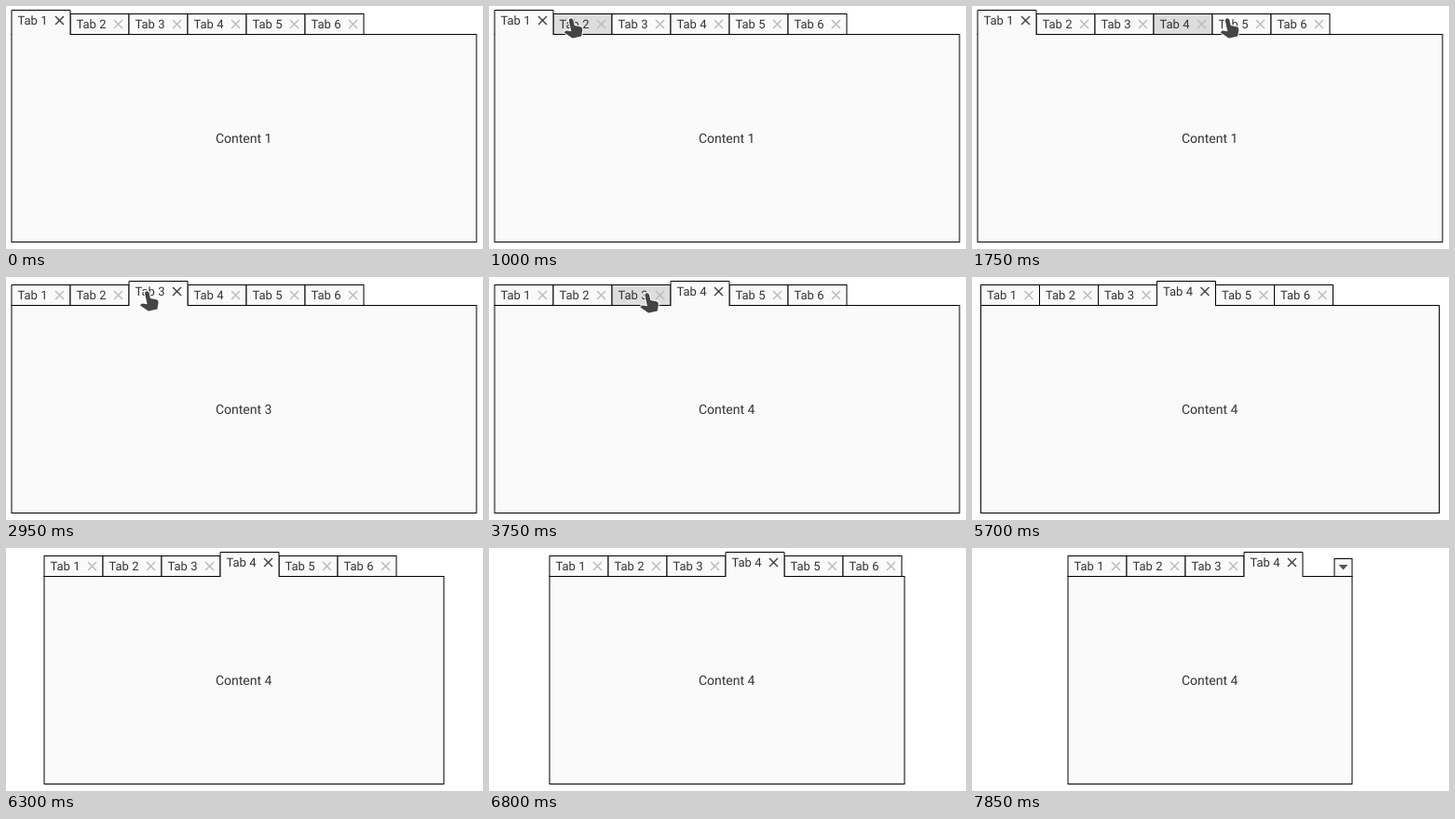
Write an HTML page with a canvas that moves like this. It is 512 by 261 pixels and loops after 8000 ms.

```html
<!DOCTYPE html>
<html lang="en">
<head>
<meta charset="utf-8">
<title>Resizable tabs</title>
<style>
html, body { margin: 0; width: 100%; height: 100%; overflow: hidden; background: #fff; }
canvas { display: block; }
</style>
</head>
<body>
<canvas id="stage" width="512" height="261"></canvas>
<script>
const ctx = document.getElementById('stage').getContext('2d');
const LOOP = 8000, STEP = 50, TAB = 63, MENU = 19;
const MID = 255.5, TOP = 30.5, BOTTOM = 253.5, HOVER_LAG = 75;

// Each move runs from start to end towards a value and rests there until the next.
function follow(value, moves, t) {
  for (const [start, end, to, power = 1] of moves) {
    const p = Math.min(1, Math.max(0, (t - start) / (end - start)));
    value += (to - value) * p ** power;
  }
  return value;
}

const handX = t => follow(-14, [[250, 1900, 318, 1.5], [2050, 2650, 151], [2950, 3250, 224], [3550, 4450, -22]], t);
const handY = t => follow(13, [[2050, 2650, 15], [3550, 3750, 17]], t);
const panelLeft = t => Math.round(2 * follow(6, [
  [5660, 5900, 27], [6050, 6300, 41], [6400, 6800, 65],
  [6900, 7100, 72], [7250, 7500, 86], [7600, 7850, 103]
], t)) / 2;

function line(color, width, ...points) {
  ctx.beginPath();
  points.forEach(([x, y]) => ctx.lineTo(x, y));
  ctx.strokeStyle = color;
  ctx.lineWidth = width;
  ctx.stroke();
}

function box(x, y, w, h, fill = '#fafafa') {
  ctx.fillStyle = fill;
  ctx.fillRect(x, y, w, h);
  ctx.strokeStyle = '#000';
  ctx.lineWidth = 1;
  ctx.strokeRect(x, y, w, h);
}

function label(text, x, y, size, align) {
  ctx.font = size + 'px Roboto, sans-serif';
  ctx.textRendering = 'geometricPrecision';
  ctx.textAlign = align;
  ctx.fillStyle = '#333';
  ctx.fillText(text, x, y);
}

function drawTab(n, x, active, hover) {
  const y = active ? 4.5 : 8.5;
  if (active) {
    ctx.fillStyle = '#fafafa';
    ctx.fillRect(x, y, TAB, TOP - y + .5);
    line('#000', 1, [x, TOP + .5], [x, y], [x + TAB, y], [x + TAB, TOP + .5]);
  } else {
    box(x, y, TAB, TOP - y, hover ? '#ddd' : '#fafafa');
  }
  label('Tab ' + n, x + 6.5, y + 15.5, 13, 'left');
  const cx = x + 51.5, cy = y + 11, r = 4.5, color = active ? '#444' : '#bbb';
  line(color, 1.5, [cx - r, cy - r], [cx + r, cy + r]);
  line(color, 1.5, [cx + r, cy - r], [cx - r, cy + r]);
}

function drawMenu(right) {
  box(right - MENU, 11.5, MENU, TOP - 11.5);
  const x = right - MENU / 2;
  ctx.fillStyle = '#555';
  ctx.fill(new Path2D(`M${x - 5} 18h10l-5 5.5Z`));
}

const hand = new Path2D('M-2 2.5Q-2 .6 0 .3Q2 .2 2.6 2L4 8L10.5 9.2Q13 10 12.6 12.4' +
  'L11.4 19.6L2.4 21.4Q1.4 21.6 .6 20.8L-7 15.4L-6.2 14.2Q-5.6 13.6 -4.6 13.6L.6 14.3Z');

function drawHand(x, y) {
  ctx.save();
  ctx.translate(x, y);
  ctx.lineJoin = 'round';
  ctx.strokeStyle = '#fff';
  ctx.lineWidth = 2;
  ctx.stroke(hand);
  ctx.fillStyle = '#444';
  ctx.fill(hand);
  ctx.restore();
}

function draw(t) {
  const left = panelLeft(t), width = 2 * (MID - left);
  const active = t < 2950 ? 1 : t < 3550 ? 3 : 4;
  const hover = Math.floor((handX(t - HOVER_LAG) - left) / TAB) + 1;
  const overflow = 6 * TAB > width;
  const count = overflow ? Math.floor((width - MENU) / TAB) : 6;

  ctx.clearRect(0, 0, 512, 261);
  box(left, TOP, width, BOTTOM - TOP);
  label('Content ' + active, 255.2, 147, 14, 'center');
  for (let n = 1; n <= count; n++)
    if (n !== active) drawTab(n, left + (n - 1) * TAB, false, n === hover);
  drawTab(active, left + (active - 1) * TAB, true);
  if (overflow) drawMenu(left + width);
  if (t >= 250) drawHand(handX(t), handY(t));
}

function tick() {
  draw(Math.floor(performance.now() % LOOP / STEP) * STEP);
  requestAnimationFrame(tick);
}
tick();
</script>
</body>
</html>
```
